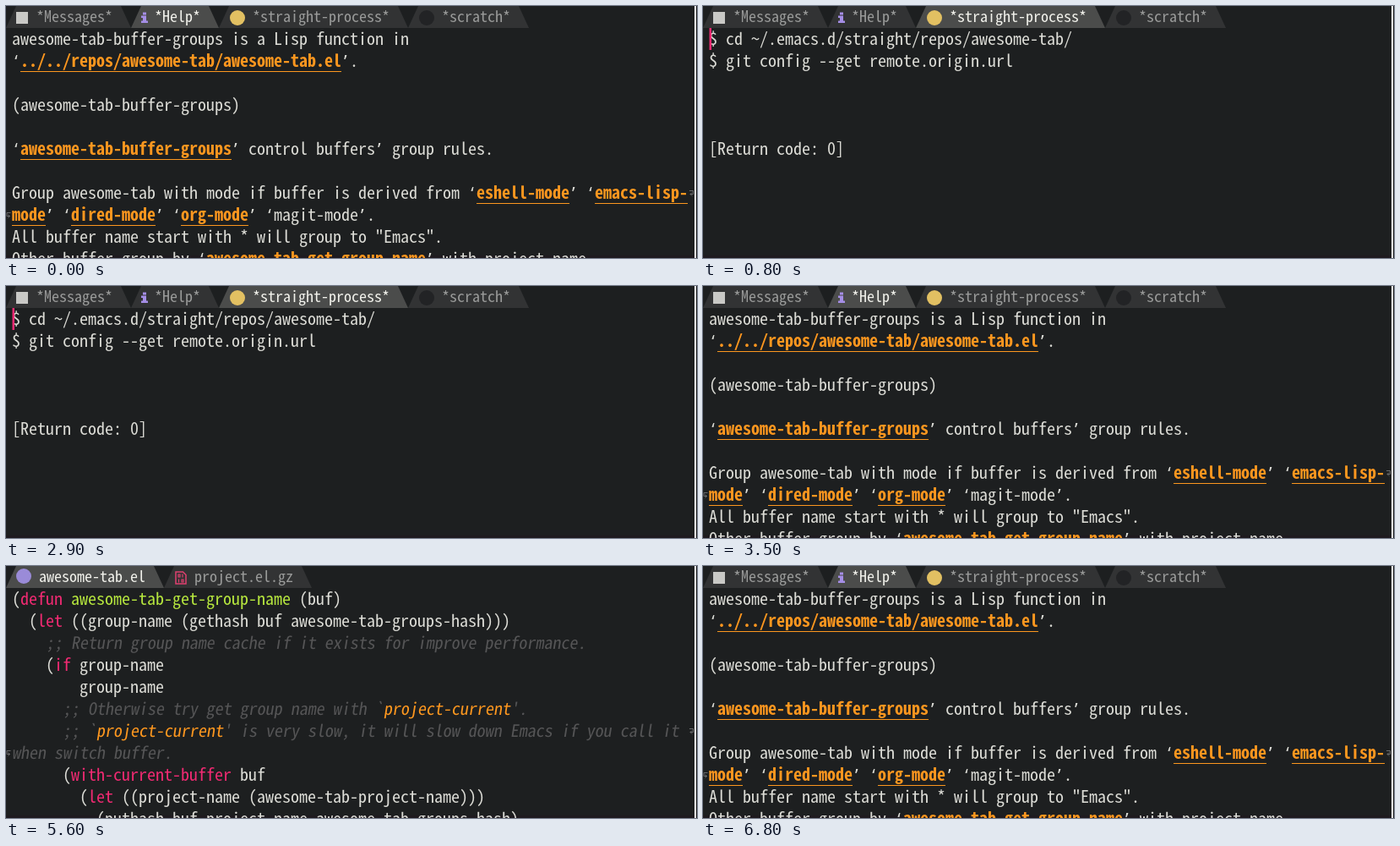
Animation, 818 px wide and 298 px high, one loop 8.1 s. Source, as an HTML page:

```html
<!DOCTYPE html>
<html lang="en">
<head>
<meta charset="utf-8">
<title>Buffer tabs</title>
<style>
html, body { margin: 0; width: 100%; height: 100%; overflow: hidden; background: #1d1f20; }
svg { display: block; width: 818px; height: 298px; }
text { font-variant-ligatures: none; font-kerning: none; white-space: pre; }
</style>
</head>
<body>
<svg id="stage" viewBox="0 0 818 298" xmlns="http://www.w3.org/2000/svg"></svg>
<script>
const NS = 'http://www.w3.org/2000/svg';
const MONO = '"Noto Sans Mono CJK SC", "Noto Sans Mono CJK JP", "Noto Sans Mono", monospace';
const QUOTE = '"Noto Sans Mono", monospace';
const ROW = 26, LEFT = 7, CELL = 10, TAB_CELL = 9;
const FG = '#dcdcd6', PINK = '#f02a72', DIM = '#6a6b6c';

// Style keys used in the {k:...} markup below
const STYLES = {
  l: { fill: '#fd971f', bold: true, line: true },
  c: { fill: '#66d9ef', box: true },
  t: { fill: '#9c91c4' },
  p: { fill: PINK },
  g: { fill: '#b6e63e' },
  m: { fill: '#555556', slant: -9 },
  o: { fill: '#fd971f', slant: -9 }
};

const stage = document.getElementById('stage');

// Advance of the installed face, in em; decides size and height of the text
const ctx = document.createElement('canvas').getContext('2d');
ctx.font = '100px ' + MONO;
const advance = ctx.measureText('a').width / 100;
const tall = advance > 0.55 ? 1.18 : 1;

function add(parent, name, attrs) {
  const el = document.createElementNS(NS, name);
  for (const k in attrs) el.setAttribute(k, attrs[k]);
  parent.appendChild(el);
  return el;
}

function rect(g, x, y, width, height, fill) {
  return add(g, 'rect', { x, y, width, height, fill });
}

function write(g, str, x, y, cell, st) {
  const quote = /[‘’]/.test(str);
  const el = add(g, 'text', {
    transform: `translate(${quote ? x + cell / 2 : x} ${y}) skewX(${st.slant || 0}) scale(1 ${quote ? 1 : tall})`,
    fill: st.fill,
    'font-family': quote ? QUOTE : MONO,
    'font-size': quote ? cell * 2 : cell / advance,
    'font-weight': st.bold ? 700 : 400,
    'text-anchor': quote ? 'middle' : 'start'
  });
  el.textContent = str;
}

function run(g, str, col, row, st) {
  const x = LEFT + col * CELL, y = ROW * (row + 1), w = str.length * CELL;
  if (st.box) rect(g, x, y, w, ROW, '#272a2b');
  if (st.line) rect(g, x, y + 25, w, 1, st.fill);
  let at = 0;
  for (const part of str.split(/([‘’])/)) {
    const lead = part.length - part.trimStart().length;
    if (part.trim()) write(g, part.trim(), x + (at + lead) * CELL, y + 20, CELL, st);
    at += part.length;
  }
}

function line(g, src, row) {
  let col = 0;
  for (const part of src.split(/(\{\w:[^}]*\})/)) {
    const tag = /^\{(\w):([^}]*)\}$/.exec(part);
    const str = tag ? tag[2] : part;
    run(g, str, col, row, tag ? STYLES[tag[1]] : { fill: FG });
    col += str.length;
  }
}

// Small hooked arrow in the fringe of a wrapped line
function wrapMark(g, row, right) {
  const y = ROW * (row + 1) + 10;
  add(g, 'path', {
    d: 'M0 .5H4.5V4.5H1M3 2.5L1 4.5L3 6.5',
    transform: right ? `translate(809 ${y})` : `translate(5.5 ${y}) scale(-1 1)`,
    fill: 'none', stroke: DIM, 'stroke-width': 1
  });
}

const icons = {
  dot: (g, x, fill, y = 14) => add(g, 'circle', { cx: x, cy: y, r: 9, fill }),
  square: (g, x, fill) => rect(g, x - 7, 7, 14, 14, fill),
  info: (g, x, fill) => add(g, 'path', {
    d: 'M-2 -6h4v3h-4zM-4 -2h6v6h2v2.5h-8v-2.5h2v-3.5h-2z',
    transform: `translate(${x} 13.5)`, fill
  }),
  binary(g, x, fill) {
    const a = { transform: `translate(${x} 14)`, fill: 'none', stroke: fill, 'stroke-width': 1.5 };
    add(g, 'path', { ...a, d: 'M-6 -7H2.5L6 -3.5V7H-6Z' });
    add(g, 'path', { ...a, 'stroke-width': 1.2, d: 'M-3 -4h2v3h-2zM2 -4.5v4M-2.5 1.5v4M1 2h2v3h-2z' });
  }
};

function tab(g, from, t, active) {
  const to = t.x + t.name.length * TAB_CELL + 22;
  add(g, 'path', {
    d: `M${from} 26L${from + 12} 0H${to - 12}L${to} 26Z`,
    fill: active ? '#4b4c4b' : '#323334'
  });
  icons[t.icon](g, t.ix, t.color, t.iy);
  write(g, t.name, t.x, 19, TAB_CELL, { fill: active ? '#f2f2ec' : '#9a9b9a' });
  return to;
}

const helpTabs = [
  { name: '*Messages*', x: 36, icon: 'square', ix: 19, color: '#c9c9c6' },
  { name: '*Help*', x: 176, icon: 'info', ix: 164, color: '#a58ee6' },
  { name: '*straight-process*', x: 292, icon: 'dot', ix: 274, color: '#e2c062' },
  { name: '*scratch*', x: 516, icon: 'dot', ix: 498, color: '#222325' }
];
const noteTabs = [
  { name: '2019-08-02-fast-switch-window-and-buffer.md', x: 39, icon: 'square', ix: 21, color: '#e8705f' }
];
const codeTabs = [
  { name: 'awesome-tab.el', x: 39, icon: 'dot', ix: 21, iy: 12, color: '#9a8bd8' },
  { name: 'project.el.gz', x: 223, icon: 'binary', ix: 207, color: '#e0406f' }
];

const help = {
  tabs: helpTabs, active: 1, left: [8], right: [7],
  text: [
    'awesome-tab-buffer-groups is a Lisp function in',
    '‘{l:../../repos/awesome-tab/awesome-tab.el}’.',
    '',
    '(awesome-tab-buffer-groups)',
    '',
    '‘{l:awesome-tab-buffer-groups}’ control buffers’ group rules.',
    '',
    'Group awesome-tab with mode if buffer is derived from ‘{l:eshell-mode}’ ‘{l:emacs-lisp-}',
    '{l:mode}’ ‘{l:dired-mode}’ ‘{l:org-mode}’ ‘magit-mode’.',
    'All buffer name start with * will group to "Emacs".',
    'Other buffer group by ‘{l:awesome-tab-get-group-name}’ with project name.'
  ]
};
const process = {
  tabs: helpTabs, active: 2, cursor: 0,
  text: [
    '$ cd ~/.emacs.d/straight/repos/awesome-tab/',
    '$ git config --get remote.origin.url',
    '',
    '',
    '',
    '[Return code: 0]'
  ]
};
const scratch = { tabs: helpTabs, active: 3, cursor: 0, text: [] };
const note = {
  tabs: noteTabs, active: 0, cursor: 10, left: [0, 1, 4], right: [0, 3],
  text: [
    'ou can customize the {t:`}{c:awesome-tab-buffer-groups-function}{t:`} variable to use your o',
    'wn rules',
    '',
    'Only buffers in current group will be shown as tabs. The arrow-key-like commands',
    ' to browse the buffer matrix are:',
    '',
    ...['backward-tab', 'forward-tab', 'backward-group', 'forward-group']
      .map(s => `{p:-} {t:\`}{c:awesome-tab-${s}}{t:\`}`)
  ]
};
const code = {
  tabs: codeTabs, active: 0, left: [7], right: [6],
  text: [
    '({p:defun} {g:awesome-tab-get-group-name} (buf)',
    '  ({p:let} ((group-name (gethash buf awesome-tab-groups-hash)))',
    '    {m:;; Return group name cache if it exists for improve performance.}',
    '    ({p:if} group-name',
    '        group-name',
    '      {m:;; Otherwise try get group name with `}{o:project-current}{m:\'.}',
    '      {m:;; `}{o:project-current}{m:\' is very slow, it will slow down Emacs if you call it }',
    '{m:when switch buffer.}',
    '      ({p:with-current-buffer} buf',
    '        ({p:let} ((project-name (awesome-tab-project-name)))',
    '          (puthash buf project-name awesome-tab-groups-hash)'
  ]
};

function build(s) {
  const g = add(stage, 'g', { visibility: 'hidden' });
  let x = 0;
  s.tabs.forEach((t, i) => { x = tab(g, x, t, i === s.active); });
  s.text.forEach((src, row) => line(g, src, row));
  (s.left || []).forEach(row => wrapMark(g, row, false));
  (s.right || []).forEach(row => wrapMark(g, row, true));
  if (s.cursor !== undefined) rect(g, LEFT + 0.5, ROW * (s.cursor + 1), 2.5, ROW, PINK);
  return g;
}

rect(stage, 0, 0, 818, 298, '#1d1f20');
rect(stage, 0, 295, 815, 3, '#1e1a1f');

const groups = new Map([help, process, scratch, note, code].map(s => [s, build(s)]));

// Window edge
rect(stage, 815, 0, 2, 298, '#f2f2f2');

const LOOP = 8100;
const steps = [
  [0, help], [800, process], [2100, scratch], [2900, process],
  [3500, help], [4600, note], [5600, code], [6800, help]
];

let shown = null;
function draw() {
  const t = performance.now() % LOOP;
  const scene = steps.filter(s => s[0] <= t).pop()[1];
  if (scene !== shown) {
    groups.forEach((g, s) => g.setAttribute('visibility', s === scene ? 'visible' : 'hidden'));
    shown = scene;
  }
  requestAnimationFrame(draw);
}
draw();
</script>
</body>
</html>
```
